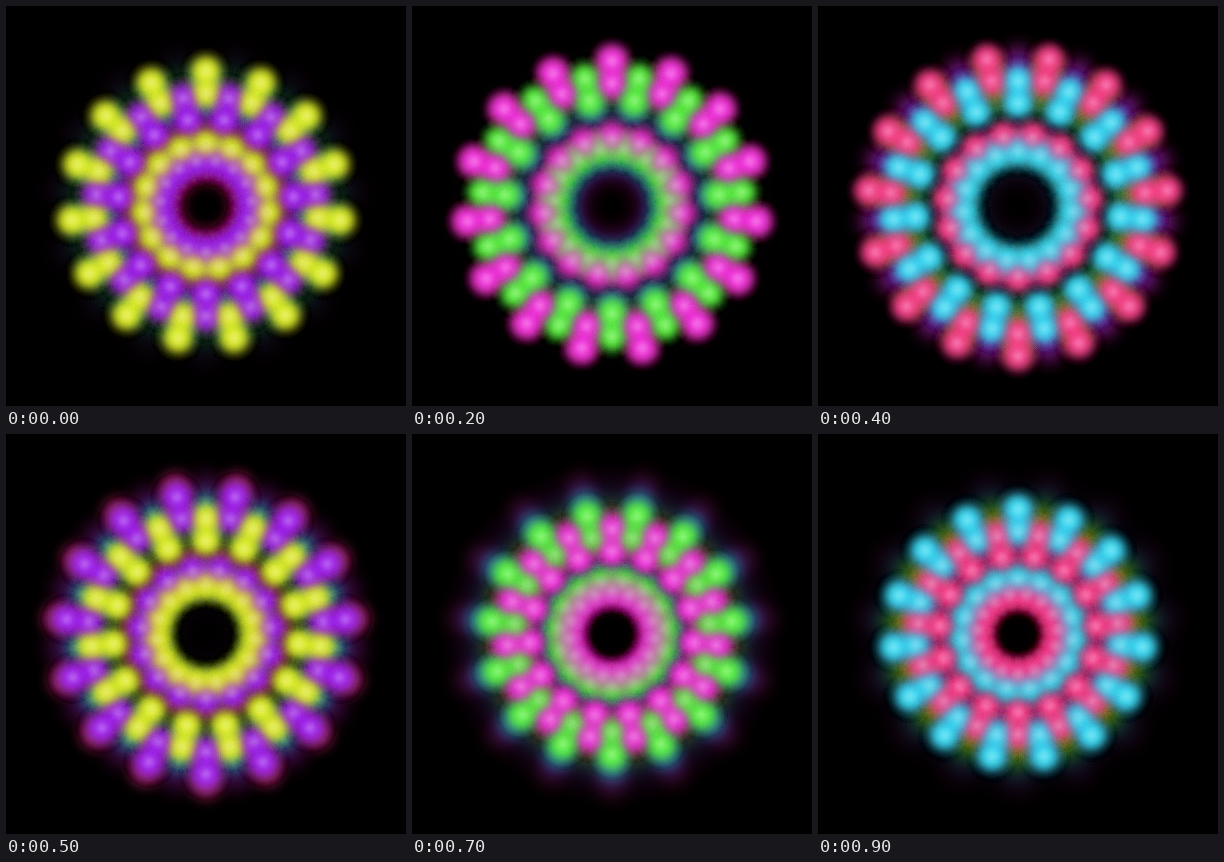
Recreate the animation shown at these times as an HTML page with a canvas. Size 400 px wide and 400 px high, loop 1 s.

```html
<!DOCTYPE html>
<html>
<head>
<meta charset="utf-8">
<style>
html, body { margin: 0; height: 100%; background: #000; overflow: hidden; }
canvas { display: block; width: 100vw; height: 100vh; }
</style>
</head>
<body>
<canvas id="stage" width="400" height="400"></canvas>
<script>
const SIZE = 400, STEPS = 10, STEP_MS = 100, SPOKES = 15;
const BLOB = 28, SPREAD = 11.8, PASSES = 8, STRENGTH = 0.32;
const FADE = 0.62, SMEAR = 4;
const YELLOW = [234, 244, 36], PURPLE = [160, 36, 246], PINK = [255, 62, 146],
      CYAN = [58, 230, 250], MAGENTA = [248, 56, 230], GREEN = [96, 248, 62];
const PAIRS = [[YELLOW, PURPLE], [PINK, CYAN], [MAGENTA, GREEN], [PURPLE, YELLOW], [CYAN, PINK]];

function makeCanvas(size) {
  const c = document.createElement('canvas');
  c.width = c.height = size;
  return c;
}

const bell = (r, width) => Math.exp(-((r / width) ** 2));

// Soft round glow with a slightly paler core.
function makeBlob(rgb) {
  const c = makeCanvas(2 * BLOB), g = c.getContext('2d');
  const fill = g.createRadialGradient(BLOB, BLOB, 0, BLOB, BLOB, BLOB);
  for (let r = 0; r <= BLOB; r += 2) {
    const pale = 0.28 * bell(r, 6);
    const tint = rgb.map(v => Math.round(v + (255 - v) * pale));
    const alpha = r < BLOB ? STRENGTH * bell(r, SPREAD) : 0;
    fill.addColorStop(r / BLOB, `rgba(${tint.join()},${alpha.toFixed(4)})`);
  }
  g.fillStyle = fill;
  g.fillRect(0, 0, 2 * BLOB, 2 * BLOB);
  return c;
}

const blobs = new Map([YELLOW, PURPLE, PINK, CYAN, MAGENTA, GREEN].map(c => [c, makeBlob(c)]));

// Radius runs linearly between 100 and 150, widest at step `peak`.
function reach(step, peak) {
  const d = Math.abs(step - peak) % STEPS;
  return 150 - 10 * Math.min(d, STEPS - d);
}

function wheel(g, outer, offset, color) {
  const blob = blobs.get(color);
  for (const r of [0.6 * outer - 20, outer - 22, outer]) {
    for (let i = 0; i < SPOKES; i++) {
      const a = (i + offset) * 2 * Math.PI / SPOKES;
      g.drawImage(blob, 200 + r * Math.sin(a) - BLOB, 200 - r * Math.cos(a) - BLOB);
    }
  }
}

// Each picture keeps a dimmed, blurred trace of the one before it.
function render(prev, step) {
  const c = makeCanvas(SIZE), g = c.getContext('2d');
  g.fillStyle = '#000';
  g.fillRect(0, 0, SIZE, SIZE);
  if (prev) {
    g.globalAlpha = FADE;
    g.filter = `blur(${SMEAR}px)`;
    g.drawImage(prev, 0, 0);
    g.filter = 'none';
    g.globalAlpha = 1;
  }
  const [even, odd] = PAIRS[step % PAIRS.length];
  // Many faint passes let overlapping colours mix evenly.
  for (let i = 0; i < PASSES; i++) {
    wheel(g, reach(step, 4), 0.5, odd);
    wheel(g, reach(step, 1.5), 0, even);
  }
  return c;
}

const pictures = [];
let last = null;
for (let i = 0; i < 2 * STEPS; i++) {
  last = pictures[i % STEPS] = render(last, i % STEPS);
}

const view = document.getElementById('stage').getContext('2d');
const start = performance.now();
function tick() {
  const t = Math.max(0, performance.now() - start);
  view.drawImage(pictures[Math.floor(t / STEP_MS) % STEPS], 0, 0);
  requestAnimationFrame(tick);
}
tick();
</script>
</body>
</html>
```
